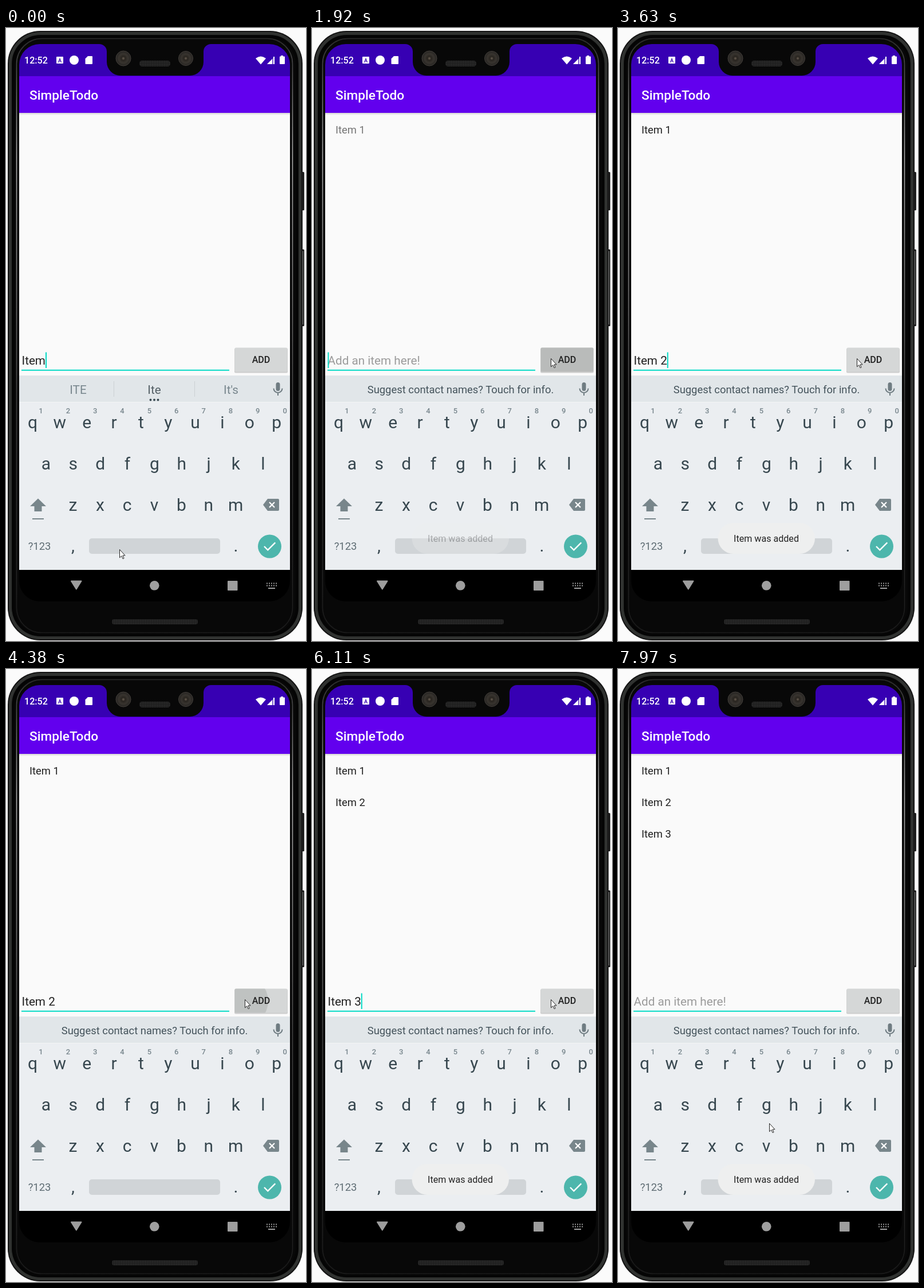
An HTML page for the animation above (8000 ms loop, 524x1069 px).

```html
<!DOCTYPE html>
<html lang="en">
<head>
<meta charset="utf-8">
<title>SimpleTodo</title>
<style>
  html, body { margin: 0; width: 100%; height: 100%; overflow: hidden; background: #fbfbfb; }
  svg { display: block; width: 100vw; height: 100vh; font-family: Roboto, "Noto Sans", sans-serif; }
  text { white-space: pre; }
  .mid { text-anchor: middle; }
  .key { font-size: 30px; fill: #37474f; text-anchor: middle; }
  .hint { font-size: 13px; font-weight: 500; fill: #78868d; text-anchor: middle; }
  .item { font-size: 18.4px; fill: #000; }
  .input { font-size: 20.7px; }
  .sug { font-size: 20.7px; fill: #78868d; text-anchor: middle; }
</style>
</head>
<body>
<svg viewBox="0 0 524 1069" preserveAspectRatio="none">
  <defs>
    <clipPath id="screenClip"><rect x="23" y="28" width="473" height="972" rx="36"/></clipPath>
    <clipPath id="buttonClip"><rect x="399.5" y="557.5" width="92" height="42" rx="2"/></clipPath>
    <linearGradient id="shine" x2="0" y2="1">
      <stop offset="0" stop-color="#2c2c2c"/>
      <stop offset=".06" stop-color="#555"/>
      <stop offset=".2" stop-color="#b5b5b5"/>
      <stop offset=".36" stop-color="#888"/>
      <stop offset=".6" stop-color="#444"/>
      <stop offset="1" stop-color="#1a1a1a"/>
    </linearGradient>
    <linearGradient id="barShadow" x2="0" y2="1">
      <stop offset="0" stop-opacity=".16"/><stop offset="1" stop-opacity="0"/>
    </linearGradient>
    <pattern id="mesh" width="3" height="3" patternUnits="userSpaceOnUse">
      <path d="M0 0h3v3H0z" fill="#1c1c1c"/><path d="M0 0h1.5v1.5H0z" fill="#383838"/>
    </pattern>
    <radialGradient id="lens">
      <stop offset="0" stop-color="#6b6054"/><stop offset=".25" stop-color="#28241f"/>
      <stop offset=".6" stop-color="#38342f"/><stop offset="1" stop-color="#252321"/>
    </radialGradient>
  </defs>

  <!-- phone body -->
  <g fill="#222">
    <rect x="515" y="251" width="6" height="67" rx="1.500"/>
    <rect x="515" y="386" width="6" height="134" rx="1.500"/>
    <path d="M518.500 389v128" stroke="#8a8a8a"/>
  </g>
  <rect x="3" y="5" width="515" height="1063" rx="57" fill="#141414"/>
  <rect x="7.5" y="9.5" width="506" height="1054" rx="53" fill="#080808" stroke="#303230" stroke-width="5"/>
  <rect x="13" y="15" width="495" height="1043" rx="48" fill="#080808" stroke="#050505" stroke-width="4"/>
  <rect x="18.5" y="18.5" width="482" height="1036" rx="44" fill="none" stroke="url(#shine)" stroke-width="1.500"/>
  <rect x="185" y="1031" width="150" height="9" rx="4" fill="url(#mesh)"/>

  <g clip-path="url(#screenClip)">
    <path d="M23 148h473v458H23z" fill="#fafafa"/>
    <path d="M23 28h473v56H23z" fill="#3700b3"/>
    <path d="M23 84h473v64H23z" fill="#6200ee"/>
    <path d="M23 148h473v4H23z" fill="url(#barShadow)"/>
    <path d="M23 606h473v46H23z" fill="#e1e6e9"/>
    <path d="M23 652h473v293H23z" fill="#ebeef1"/>
    <path d="M23 945h473v55H23z"/>
  </g>

  <!-- notch -->
  <path d="M163 26V28A13 13 0 0 1 176 41V59A24 24 0 0 0 200 83H321A24 24 0 0 0 345 59V41A13 13 0 0 1 358 28V26z" fill="#080808"/>
  <g fill="url(#lens)" stroke="#45413c">
    <circle cx="205" cy="53" r="13"/><circle cx="314" cy="53" r="12.500"/>
  </g>
  <rect x="233" y="57" width="54" height="10" rx="4.500" fill="url(#mesh)"/>

  <!-- status bar -->
  <g fill="#fff">
    <text x="32" y="62" font-size="16.100" font-weight="500">12:52</text>
    <rect x="88" y="50" width="12" height="12" rx="1"/>
    <text class="mid" x="94" y="59.500" font-size="9" font-weight="700" style="fill:#3700b3">A</text>
    <circle cx="119" cy="56" r="8"/>
    <path d="M143 49h7q1 0 1 1v12q0 1-1 1h-10.500q-1 0-1-1v-8.500z"/>
    <path d="M436 53q9-7 18 0l-9 10.500z"/>
    <path d="M469 50v13h-13z" fill-opacity=".35"/>
    <path d="M465 54v9h-9zM467 50h2v13h-2z"/>
    <path d="M480 49.500v-1.500h4v1.500h2q1 0 1 1V62q0 1-1 1h-7q-1 0-1-1V50.500q0-1 1-1z"/>
    <text x="41" y="125" font-size="22.700" font-weight="500">SimpleTodo</text>
  </g>

  <!-- list and entry row -->
  <g id="items"></g>
  <text id="input" class="input" x="27.500" y="587"></text>
  <path d="M27 595.700h363v2H27z" fill="#03dac5"/>
  <rect id="caret" y="565.500" width="2" height="27.500" fill="#03dac5"/>
  <rect x="399" y="558.500" width="93" height="43" rx="2" fill="#000" opacity=".18"/>
  <rect x="399.500" y="557.500" width="92" height="42" rx="2" fill="#d5d7d7"/>
  <circle id="ripple" cx="415" cy="579" fill="#b9bbba" clip-path="url(#buttonClip)"/>
  <text class="mid" x="445.500" y="584" font-size="16.100" font-weight="500" fill="#212121">ADD</text>

  <!-- suggestion strip -->
  <text id="notice" class="mid" x="259.500" y="636.500" font-size="18.400" fill="#45545c">Suggest contact names? Touch for info.</text>
  <g id="words">
    <path d="M188.500 616v27M329.500 616v27" stroke="#cbd1d4"/>
    <text class="sug" x="126" y="637.500"></text>
    <text class="sug" x="259" y="637.500" style="fill:#546066"></text>
    <text class="sug" x="393" y="637.500"></text>
    <g fill="#37474f">
      <circle cx="252.500" cy="648.500" r="1.900"/><circle cx="259" cy="648.500" r="1.900"/><circle cx="265.500" cy="648.500" r="1.900"/>
    </g>
  </g>
  <rect x="471.500" y="618" width="7" height="15" rx="3.500" fill="#6f7c82"/>
  <path d="M467.500 628.500a7.500 7.500 0 0 0 15 0M475 636v5" fill="none" stroke="#6f7c82" stroke-width="2"/>

  <!-- keyboard -->
  <path d="M23 652.500h473" stroke="#f3f5f6"/>
  <g id="keys"></g>
  <path d="M56 820.500l14 13.500h-7.500v9h-13v-9H42zM46 855h20v2H46z" fill="#78868b"/>
  <path d="M457 821h18q2 0 2 2v17q0 2-2 2h-18l-8-10.500z" fill="#78868b"/>
  <path d="M460 827l9 9m0-9l-9 9" stroke="#fff" stroke-width="2.200"/>
  <text class="mid" x="58.500" y="910" font-size="18.400" fill="#5f6d74">?123</text>
  <text class="key" x="117" y="913">,</text>
  <text class="key" x="401.500" y="913">.</text>
  <rect x="145" y="890" width="229" height="27" rx="5" fill="#d0d4d7"/>
  <circle cx="460.500" cy="904" r="20.500" fill="#4db6ac"/>
  <path d="M451 904l6.300 6.300 13-13" fill="none" stroke="#fff" stroke-width="2.400"/>

  <!-- navigation bar -->
  <g fill="#9e9e9e">
    <path d="M114 964.500h17.500l-8.700 14z" stroke="#9e9e9e" stroke-width="2" stroke-linejoin="round"/>
    <circle cx="259.300" cy="972.300" r="8.300"/>
    <rect x="387" y="964" width="17.500" height="17" rx="1"/>
    <path d="M458 976h12v2h-12z"/>
    <path d="M455 968.500h18M455 972.500h18" stroke="#9e9e9e" stroke-width="2" stroke-dasharray="2 2"/>
  </g>

  <g id="toast">
    <rect x="174.500" y="863" width="169.500" height="54" rx="27" fill="#eeefef"/>
    <text class="mid" x="259" y="895.500" font-size="16.100" fill="#222">Item was added</text>
  </g>
  <path id="mouse" d="M.5.500v14.200l3.300-3 2.300 5 2-.9-2.200-4.900h4.200z" fill="#fff" stroke="#222"/>
</svg>
<script>
const LOOP = 8000;
const $ = id => document.getElementById(id);
const NS = 'http://www.w3.org/2000/svg';

function addText(parent, cls, x, y, label) {
  const el = document.createElementNS(NS, 'text');
  el.setAttribute('class', cls);
  el.setAttribute('x', x);
  el.setAttribute('y', y);
  el.textContent = label;
  return parent.appendChild(el);
}

const PITCH = 47.35;
[['qwertyuiop', 46.5, 698], ['asdfghjkl', 70, 770], ['zxcvbnm', 117, 842]].forEach(([row, x, y]) =>
  [...row].forEach((c, i) => addText($('keys'), 'key', x + PITCH * i, y, c)));
[...'1234567890'].forEach((c, i) => addText($('keys'), 'hint', 61 + PITCH * i, 671.5, c));
const items = [1, 2, 3].map(n => addText($('items'), 'item', 41, 183.5 + 55.2 * (n - 1), 'Item ' + n));

// Each track lists [start time, value]; a value holds until the next entry.
const typed = [
  [0, 'Item'], [150, 'Item '], [400, 'Item 1'], [1920, ''],
  [2780, 'I'], [3020, 'It'], [3140, 'Ite'], [3260, 'Item'], [3380, 'Item '], [3630, 'Item 2'], [4500, ''],
  [5390, 'I'], [5630, 'It'], [5750, 'Ite'], [5870, 'Item'], [5990, 'Item '], [6110, 'Item 3'], [7200, '']
];
const forI = ["I'm", 'I', 'In'], forIt = ['If', 'It', "It's"];
const forIte = ['ITE', 'Ite', "It's"], forItem = ['ITEM', 'Item', 'Items'];
const words = [
  [0, forIte], [150, forItem], [400, null],
  [2900, forI], [3140, forIt], [3260, forIte], [3380, forItem], [3630, null],
  [5510, forI], [5750, forIt], [5870, forIte], [5990, forItem], [6110, null]
];
const caretOn = [
  [0, 1], [960, 0], [1440, 1], [2400, 0], [2780, 1], [4140, 0], [4500, 1],
  [5010, 0], [5390, 1], [6600, 0], [7080, 1], [7580, 0]
];
const toast = [
  [0, 0], [1920, .3], [2040, .85], [2160, 1], [3880, .95], [4020, .5], [4140, .12], [4260, 0],
  [4500, .3], [4620, .8], [4770, .95], [4890, 1], [6600, .5], [6720, .12], [6840, 0],
  [7200, .3], [7320, .9], [7440, 1]
];
const itemAlpha = [
  [[0, 0], [1920, .53], [2040, .87]],
  [[0, 0], [4500, .6], [4620, .87]],
  [[0, 0], [7200, .67], [7320, .87]]
];
const presses = [1800, 4380, 7080];
const lateMouse = [[1680, [417, 576]], [7580, [410, 576]], [7820, [345, 676]], [7970, [264, 792]]];

function at(track, t) {
  let value = track[0][1];
  for (const [start, v] of track) if (start <= t) value = v;
  return value;
}

function mouseAt(t) {
  if (t >= 1680) return at(lateMouse, t);
  const p = Math.max(0, Math.floor((t - 960) / 120) / 6);
  const e = p * p * (3 - 2 * p);
  return [198 + 219 * e, 909 - 333 * e];
}

function drawButton(t) {
  const age = t - Math.max(...presses.map(p => p <= t ? p : -LOOP));
  $('ripple').setAttribute('r', age < 120 ? 43 : 100);
  $('ripple').setAttribute('opacity', age < 120 ? .75 : age < 240 ? 1 : age < 360 ? .25 : 0);
}

const input = $('input'), caret = $('caret');
const wordEls = $('words').querySelectorAll('text');
const widths = {};

function textWidth(s) {
  if (!s) return 0;
  if (!(s in widths)) widths[s] = input.getComputedTextLength();
  return widths[s];
}

function draw(t) {
  const value = at(typed, t);
  input.textContent = value || 'Add an item here!';
  input.setAttribute('fill', value ? '#212121' : '#9b9b9b');
  caret.setAttribute('x', 27.5 + textWidth(value));
  caret.setAttribute('opacity', at(caretOn, t));

  const list = at(words, t);
  $('notice').style.display = list ? 'none' : '';
  $('words').style.display = list ? '' : 'none';
  if (list) wordEls.forEach((el, i) => { el.textContent = list[i]; });
  wordEls[1].setAttribute('font-weight', list === forIt ? 700 : 400);

  items.forEach((el, i) => el.setAttribute('opacity', at(itemAlpha[i], t)));
  $('toast').setAttribute('opacity', at(toast, t));
  drawButton(t);
  $('mouse').setAttribute('transform', `translate(${mouseAt(t)})`);
}

const begin = performance.now();
function tick() {
  draw((performance.now() - begin) % LOOP);
  requestAnimationFrame(tick);
}
tick();
</script>
</body>
</html>
```
